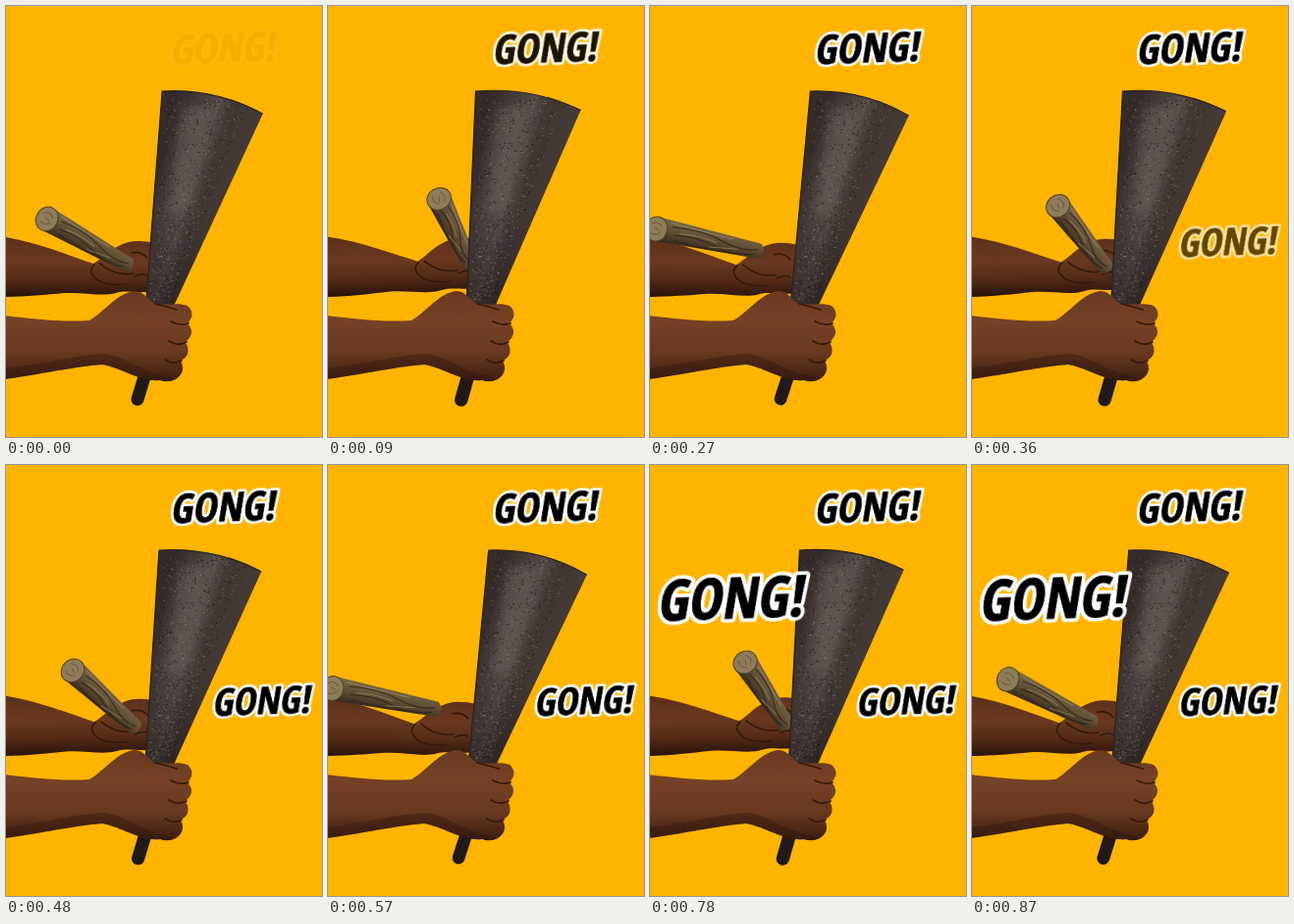
Recreate the animation shown at these times as an HTML page. Size 322 by 440 pixels, loop 0.9 s.

```html
<!DOCTYPE html>
<html lang="en">
<head>
<meta charset="utf-8">
<title>Gong</title>
<style>
  @property --u { syntax: '<number>'; inherits: true; initial-value: 0; }

  html, body { margin: 0; width: 100%; height: 100%; overflow: hidden; background: #ffb400; }
  svg { display: block; width: 100vw; height: 100vh; }

  /* --u: low = apart, high = striking; three strikes per loop */
  #scene { animation: swing 900ms -20ms infinite cubic-bezier(.37, 0, .63, 1); }
  @keyframes swing {
    0%, 100% { --u: -.12; }
    13.1%, 47.9%, 84.1% { --u: 1.2; }
    30.9%, 65.2% { --u: -.65; }
  }

  #back { transform: translate(calc(var(--u) * 2px), 265px) rotate(calc(var(--u) * -1.2deg)) translate(0, -265px); }
  #stick { transform: translate(calc(43px + var(--u) * 59px), calc(217px - var(--u) * 17px)) rotate(calc(30deg + var(--u) * 29deg)); }
  #shaft { transform: scaleX(calc(1 - var(--u) * .2)); }
  #bell { transform: translate(157px, 330px) rotate(calc(var(--u) * -1.7deg)) scaleX(calc(1 + var(--u) * .03)) translate(-157px, -330px); }

  .word text {
    font-family: "Open Sans Condensed", "Roboto Condensed", "Noto Sans", "Open Sans", sans-serif;
    font-stretch: extra-condensed;
    font-weight: 900;
    stroke-linejoin: round;
  }
  .rim { fill: #fff; stroke: #fff; stroke-width: 5.5px; }
  .ink { fill: #000; stroke: #000; stroke-width: .6px; }

  #w1 { animation: in1 900ms linear infinite; }
  #w2 { animation: in2 900ms linear infinite; }
  #w3 { animation: in3 900ms linear infinite; }
  @keyframes in1 { 0%, 1.5% { opacity: 0; } 11.1%, 100% { opacity: 1; } }
  @keyframes in2 { 0%, 33.3% { opacity: 0; } 44.4%, 100% { opacity: 1; } }
  @keyframes in3 { 0%, 68.3% { opacity: 0; } 79.4%, 100% { opacity: 1; } }
</style>
</head>
<body>
<svg viewBox="0 0 322 440">
  <defs>
    <linearGradient id="skin" gradientUnits="userSpaceOnUse" x1="0" y1="294" x2="0" y2="386">
      <stop offset="0" stop-color="#6b3a20"/>
      <stop offset=".3" stop-color="#754226"/>
      <stop offset=".65" stop-color="#693820"/>
      <stop offset="1" stop-color="#381c0e"/>
    </linearGradient>
    <linearGradient id="skinBack" gradientUnits="userSpaceOnUse" x1="0" y1="238" x2="0" y2="296">
      <stop offset="0" stop-color="#5f311a"/>
      <stop offset=".4" stop-color="#6a381e"/>
      <stop offset=".7" stop-color="#552b17"/>
      <stop offset="1" stop-color="#2c150a"/>
    </linearGradient>
    <linearGradient id="metal" gradientUnits="userSpaceOnUse" x1="148" y1="185" x2="226" y2="210">
      <stop offset="0" stop-color="#352c2a"/>
      <stop offset=".2" stop-color="#433937"/>
      <stop offset=".48" stop-color="#554b48"/>
      <stop offset=".7" stop-color="#3a302e"/>
      <stop offset="1" stop-color="#443a37"/>
    </linearGradient>
    <linearGradient id="shade" gradientUnits="userSpaceOnUse" x1="0" y1="210" x2="0" y2="306">
      <stop offset="0" stop-color="#241c1a" stop-opacity="0"/>
      <stop offset="1" stop-color="#241c1a" stop-opacity=".6"/>
    </linearGradient>
    <linearGradient id="wood" x1="0" y1="0" x2="0" y2="1">
      <stop offset="0" stop-color="#7a6848"/>
      <stop offset=".5" stop-color="#5f4d34"/>
      <stop offset="1" stop-color="#35291c"/>
    </linearGradient>
    <filter id="soft" x="-30%" y="-30%" width="160%" height="160%"><feGaussianBlur stdDeviation="5"/></filter>
  </defs>

  <rect width="322" height="440" fill="#ffb400"/>

  <g id="scene">
    <g id="back">
      <path fill="url(#skinBack)" d="M-6 235 C28 240 60 253 89 263 C98 258 105 249 117 244 Q130 237 152 242 V290 C138 295 124 289 112 293 C98 297 80 292 60 293 C38 295 18 297 -6 297Z"/>
      <path fill="none" stroke="#34190c" stroke-width="1.6" stroke-linecap="round" d="M90 264 Q83 270 91 278 T122 284 M96 263 Q112 276 129 273 M128 252 Q138 250 144 257 M131 276 Q139 272 144 275"/>
    </g>

    <g id="stick">
      <g id="shaft">
        <path fill="url(#wood)" d="M0 -12.5 L96 -7.5 Q103 0 96 8 L0 12.5Z"/>
        <path fill="none" stroke="#2c2116" stroke-opacity=".7" stroke-width="1.3" d="M14 -5 Q40 -9 60 -2 T94 -1 M16 3 Q38 -1 55 5 T92 4 M18 8 Q50 11 88 6"/>
        <path fill="none" stroke="#a8946c" stroke-opacity=".6" d="M12 -9 Q45 -7 70 -6 M22 0 Q40 -3 56 1 M50 7 L76 3"/>
      </g>
      <ellipse rx="11" ry="12.6" fill="#8d7b5a" stroke="#544329"/>
      <path fill="none" stroke="#6d5939" d="M-6 -4 Q0 -9 5 -3 M-5 5 Q1 8 5 2 M-2 -1 L3 1"/>
    </g>

    <g id="bell">
      <path stroke="#211917" stroke-width="13" stroke-linecap="round" d="M145 366 L134 401.5"/>
      <path fill="url(#metal)" d="M159 87 Q213 84 261.5 110 L164 321 H141Z"/>
      <path fill="#776c68" opacity=".4" filter="url(#soft)" d="M180 103 L211 104 L184 205 L164 215Z"/>
      <path fill="#443a36" opacity=".75" d="M229 95 Q246 101 261.5 110 L170 308 L180 255Z"/>
      <path fill="url(#shade)" d="M150 208 L216 208 L164 321 H141Z"/>
      <path id="specks" fill="none" stroke="#9b908a" stroke-opacity=".5" stroke-width=".9"/>
      <path id="pits" fill="none" stroke="#1c1513" stroke-opacity=".6" stroke-width="1.2"/>
      <path fill="none" stroke="#2a2220" stroke-width="1.2" d="M141.5 318 L159 87 Q213 84 261.5 110"/>
    </g>

    <g id="front">
      <path fill="url(#skin)" d="M-2 316 C25 319 55 323 85 321 C103 310 112 294 130 291 C140 290 144 300 152 304 C164 306 176 302 185 306 Q194 314 185 324 Q194 334 183 343 Q190 356 178 362 Q184 374 173 381 Q165 385 157 382 C136 384 120 370 98 366 C70 368 30 377 -2 381Z"/>
      <path fill="#2d160b" opacity=".4" d="M-2 381 V370 C40 365 75 356 100 355 C122 358 136 372 157 376 L173 381 Q165 385 157 382 C136 384 120 370 98 366 C70 368 30 377 -2 381Z"/>
      <path fill="none" stroke="#371a0c" stroke-width="1.8" stroke-linecap="round" d="M186 324 Q177 327 168 322 M184 343 Q175 348 166 342 M179 362 Q170 367 162 361 M152 304 Q164 307 174 310"/>
    </g>
  </g>

  <g class="word" id="w1"><g transform="translate(167.5 59.5) rotate(-2) scale(1.11)"></g></g>
  <g class="word" id="w2"><g transform="translate(210 256) rotate(-2) scale(1.04)"></g></g>
  <g class="word" id="w3"><g transform="translate(7 159.5) rotate(-2) scale(1.55)"></g></g>
</svg>

<script>
  const NS = 'http://www.w3.org/2000/svg';

  // Every word is about 100 units wide, slant included
  function addText(parent, cls) {
    const t = document.createElementNS(NS, 'text');
    t.setAttribute('class', cls);
    t.setAttribute('transform', 'skewX(-11)');
    t.textContent = 'GONG!';
    t.style.fontSize = '46px';
    parent.append(t);
    t.style.fontSize = Math.min(46, 46 * 96 / t.getComputedTextLength()) + 'px';
  }
  for (const g of document.querySelectorAll('.word > g')) {
    addText(g, 'rim');
    addText(g, 'ink');
  }

  let seed = 7;
  const rand = () => (seed = seed * 16807 % 2147483647) / 2147483647;

  // Scatter short flecks over the cone
  function flecks(count, maxLen) {
    let d = '';
    for (let i = 0; i < count; i++) {
      const y = 96 + 205 * rand() ** 1.2;
      const left = 160 - .075 * (y - 87);
      const right = Math.min(259 - .46 * (y - 110), 170 + 6 * (y - 86));
      const x = left + (right - left) * (.04 + .8 * rand());
      d += `M${x.toFixed(1)} ${y.toFixed(1)}l${(.4 + rand() * maxLen).toFixed(1)} ${(rand() - .5).toFixed(1)}`;
    }
    return d;
  }
  document.getElementById('specks').setAttribute('d', flecks(420, 1.4));
  document.getElementById('pits').setAttribute('d', flecks(320, 1.6));
</script>
</body>
</html>
```
